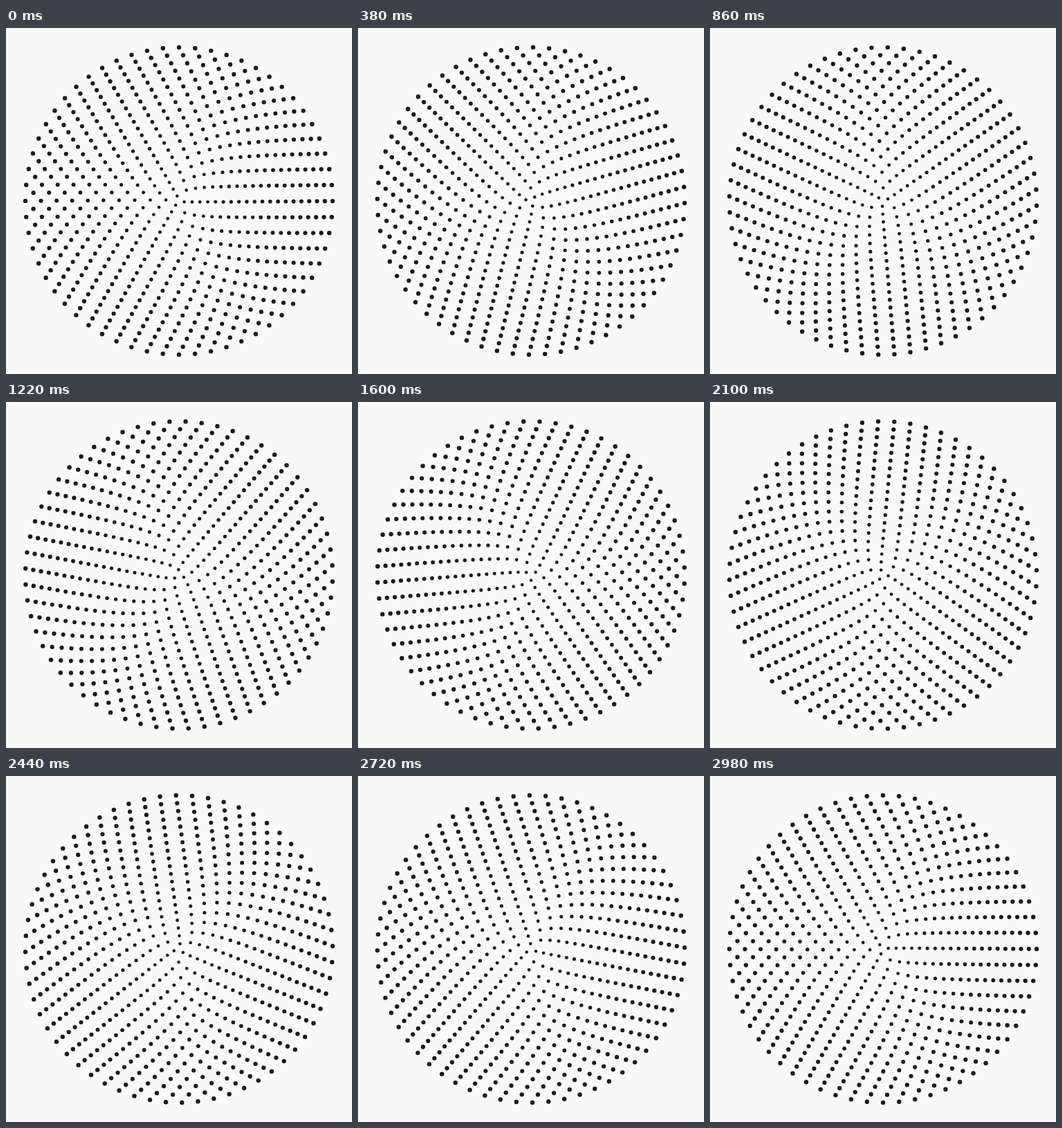
An HTML page with a canvas for the animation above (3 s loop, 500 by 500 pixels).

```html
<!DOCTYPE html>
<html lang="en">
<head>
<meta charset="utf-8">
<title>Dot rings</title>
<style>
  html, body { margin: 0; height: 100%; overflow: hidden; background: #f9f9f9; }
  canvas { display: block; }
</style>
</head>
<body>
<canvas width="500" height="500"></canvas>
<script>
const ctx = document.querySelector('canvas').getContext('2d');
const LOOP = 3000, RINGS = 20, TAU = 2 * Math.PI;
const lerp = (a, b, u) => a + (b - a) * u;

function draw(ms) {
  const t = ((ms + 10) % LOOP) / LOOP;
  ctx.fillStyle = '#f9f9f9';
  ctx.fillRect(0, 0, 500, 500);
  ctx.fillStyle = '#1c1b1c';
  for (let k = 1; k <= RINGS; k++) {
    const u = (k - 1) / (RINGS - 1);
    const radius = lerp(7.7, 222, u);
    const size = lerp(2.3, 3.2, u);
    const step = TAU / (3 * k);
    // Each ring turns one dot step more per loop than the ring outside it.
    const shift = (RINGS + 1 - k) * t;
    for (let j = 0; j < 3 * k; j++) {
      const a = (j + shift) * step;
      ctx.beginPath();
      ctx.arc(250 + radius * Math.cos(a), 250 + radius * Math.sin(a), size, 0, TAU);
      ctx.fill();
    }
  }
}

function tick() {
  draw(performance.now());
  requestAnimationFrame(tick);
}
tick();
</script>
</body>
</html>
```
